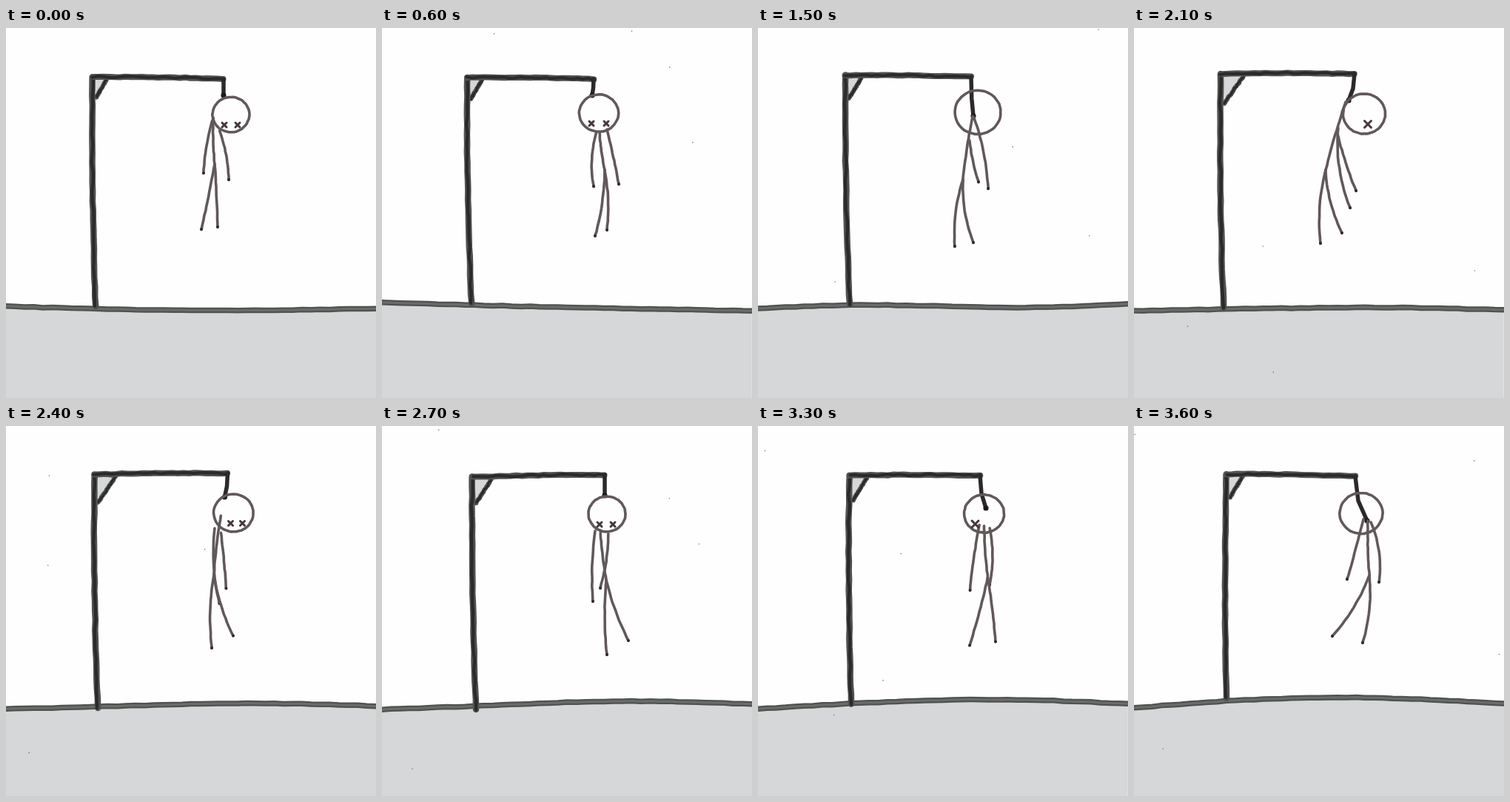
An HTML page that plays this animation: 500 px wide and 500 px high, repeating every 3900 ms.

```html
<!DOCTYPE html>
<html lang="en">
<head>
<meta charset="utf-8">
<title>Hangman</title>
<style>
  html, body { margin: 0; width: 100%; height: 100%; overflow: hidden; background: #fefefe; }
  svg { display: block; width: 100%; height: 100%; }
  path { fill: none; stroke-linecap: round; stroke-linejoin: round; }
</style>
</head>
<body>
<svg id="stage" viewBox="0 0 500 500"></svg>
<script>
const STEP = 300;
const INK = '#505250', DARK = '#2c292a', BODY = '#61585a', TIP = '#31282a', SOIL = '#d6d7d9';

// Key points only: arms are [shoulder, hand], legs are feet below the hip,
// sway bends the arms and the legs, ground is [left, right, hump, wave].
const swinging = {
  ground: [376, 379, 4, 0], corner: [117, 66], foot: [121, 376], tip: [294, 69], brace: 19,
  knot: [294, 91], head: [304, 117, 25], eyes: [-9, 9],
  neck: [280, 122], hip: [282, 184], arms: [[[280, 122], [267, 196]], [[289, 139], [301, 205]]],
  feet: [[264, 272], [286, 269]], sway: [0, -0.5]
};
const front = {
  ground: [371, 382, 1, 0], corner: [115, 67], foot: [121, 372], tip: [286, 69], brace: 20,
  knot: [284, 91], head: [293, 115, 26.5], eyes: [-10, 10],
  neck: [294, 141], hip: [301, 192], arms: [[[290, 141], [286, 214]], [[304, 137], [320, 211]]],
  feet: [[288, 281], [304, 273]], sway: [2, -3]
};
const back = {
  ground: [379, 373, 0, -3], corner: [118, 64], foot: [124, 374], tip: [288, 66], brace: 22,
  knot: [291, 119], head: [297, 114, 31], eyes: [],
  neck: [290, 119], hip: [277, 205], arms: [[[286, 152], [298, 208]], [[292, 121], [311, 217]]],
  feet: [[266, 295], [291, 290]], sway: [-1, 4.5]
};
const sideRight = {
  ground: [382, 381, -3.5, 0.7], corner: [117, 62], foot: [121, 378], tip: [298, 62], brace: 31,
  knot: [290, 98], head: [311, 116, 28.5], eyes: [5],
  neck: [286, 100], hip: [259, 192], arms: [[[276, 135], [292, 243]], [[275, 143], [300, 220]]],
  feet: [[252, 291], [281, 277]], sway: [4, 4.5]
};
const hanging = {
  ground: [383, 376, -6, 1.5], corner: [122, 69], foot: [127, 383], tip: [301, 66], brace: 26,
  knot: [301, 94], head: [304, 119, 25], eyes: [-10, 8],
  neck: [295, 142], hip: [303, 208], arms: [[[288, 142], [285, 237]], [[306, 146], [295, 219]]],
  feet: [[304, 309], [333, 290]], sway: [0, 2.5]
};
const backRight = {
  ground: [381, 375, -11, 0], corner: [125, 65], foot: [125, 368], tip: [299, 68], brace: 22,
  knot: [315, 128], head: [307, 118, 29], eyes: [],
  neck: [316, 128], hip: [318, 202], arms: [[[310, 126], [288, 207]], [[320, 130], [331, 211]]],
  feet: [[268, 284], [309, 293]], sway: [-3, -4.5]
};

function mix(a, b, t) {
  if (Array.isArray(a)) return a.map((v, i) => mix(v, b[i], t));
  return a + (b - a) * t;
}

function between(a, b, t, eyes) {
  const keys = Object.keys(a).filter(key => key !== 'eyes');
  return { eyes, ...Object.fromEntries(keys.map(key => [key, mix(a[key], b[key], t)])) };
}

const POSES = [
  swinging,
  between(swinging, front, 0.5, [-9, 9]),
  front,
  between(front, back, 1 / 3, [-18, -2]),
  back && between(front, back, 2 / 3, [-18]),
  back,
  between(back, sideRight, 0.5, []),
  sideRight,
  between(sideRight, hanging, 0.5, [-4, 12]),
  hanging,
  { ...hanging, slip: [2, 244] },
  between(hanging, backRight, 0.5, [-12]),
  backRight
];

function seeded(seed) {
  return () => {
    seed = (seed * 16807) % 2147483647;
    return seed / 2147483647;
  };
}
let random = seeded(1);

// Samples a curve with the slight tremble of a hand.
function trace(at, steps, tremble = 0.4) {
  const points = [];
  for (let i = 0; i <= steps; i++) {
    points.push(at(i / steps).map(v => (v + (random() - 0.5) * 2 * tremble).toFixed(1)));
  }
  return 'M' + points.join('L');
}

// A line from a to b whose middle is pushed sideways by bend.
function bow([ax, ay], [bx, by], bend = 0) {
  const length = Math.hypot(bx - ax, by - ay);
  return t => {
    const push = 4 * t * (1 - t) * bend / length;
    return [mix(ax, bx, t) - (by - ay) * push, mix(ay, by, t) + (bx - ax) * push];
  };
}

const stroke = (d, color, width, extra = '') =>
  `<path d="${d}" stroke="${color}" stroke-width="${width}" ${extra}/>`;
const fill = d => `<path d="${d}" style="fill:${SOIL}"/>`;
const dot = ([x, y], r, color) => `<circle cx="${x}" cy="${y}" r="${r}" fill="${color}"/>`;

function marker(at, width) {
  return stroke(trace(at, 24, 0.5), INK, width) + stroke(trace(at, 24, 1), DARK, width * 0.5);
}

function ground([left, right, hump, wave]) {
  const line = trace(u => [
    500 * u,
    mix(left, right, u) + hump * Math.sin(Math.PI * u) + wave * Math.sin(2 * Math.PI * u)
  ], 40);
  return fill(line + 'V500H0Z') + stroke(line, INK, 7.5) + stroke(line, '#686d6a', 3);
}

function gallows({ corner, foot, tip, brace, knot }) {
  const [x, y] = corner;
  const top = [x + brace, y + 3], low = [x + 5, y + brace + 9];
  const elbow = [mix(tip[0], knot[0], 0.25), mix(tip[1], knot[1], 0.55)];
  return fill(`M${corner}L${top}L${low}Z`) +
    marker(bow(top, low), 6) +
    marker(bow(corner, foot, 2), 8.5) +
    marker(bow(corner, tip, -1), 8) +
    stroke(`M${tip}L${elbow}L${knot}`, DARK, 5.5) + dot(knot, 3.6, '#1d191b');
}

function limb(from, to, bend) {
  return stroke(trace(bow(from, to, bend), 14, 0.3), BODY, 3.6) + dot(to, 2, TIP);
}

function figure({ head: [cx, cy, r], eyes, neck, hip, arms, feet, sway }) {
  const outline = trace(t => [
    cx + r * Math.cos(2 * Math.PI * t),
    cy + r * 0.95 * Math.sin(2 * Math.PI * t)
  ], 48, 0.3);
  const size = eyes.length === 1 ? 4.5 : 3;
  const crosses = eyes.map(dx => stroke(
    `M${cx + dx - size} ${cy + 14 - size}l${2 * size} ${2 * size}m0 ${-2 * size}l${-2 * size} ${2 * size}`,
    '#43373a', 3));
  return stroke(outline + 'Z', BODY, 3.6) +
    stroke(trace(bow(neck, hip, 1), 14, 0.3), BODY, 3.6) +
    arms.map(([shoulder, hand], i) => limb(shoulder, hand, sway[0] + (i ? -2.5 : 2.5))).join('') +
    feet.map(foot => limb(hip, foot, sway[1])).join('') +
    crosses.join('');
}

function specks(count) {
  return Array.from({ length: count }, () =>
    dot([random() * 500, random() * 490], 0.8, '#77727a')).join('');
}

function draw(pose, index) {
  random = seeded(index * 977 + 31);
  const fold = pose.slip ? stroke('M0 215H280L460 220', '#e2e2e2', 1, 'stroke-dasharray="1 4"') : '';
  return `${fold}<g transform="translate(${pose.slip ?? [0, 0]})">` +
    ground(pose.ground) + gallows(pose) + figure(pose) + '</g>' + specks(index ? 4 : 0);
}

const stage = document.getElementById('stage');
const drawings = POSES.map(draw);
const start = performance.now();
let shown = -1;

function update(now) {
  const index = Math.floor(Math.max(0, now - start) / STEP) % drawings.length;
  if (index !== shown) stage.innerHTML = drawings[shown = index];
  requestAnimationFrame(update);
}
update(start);
</script>
</body>
</html>
```
